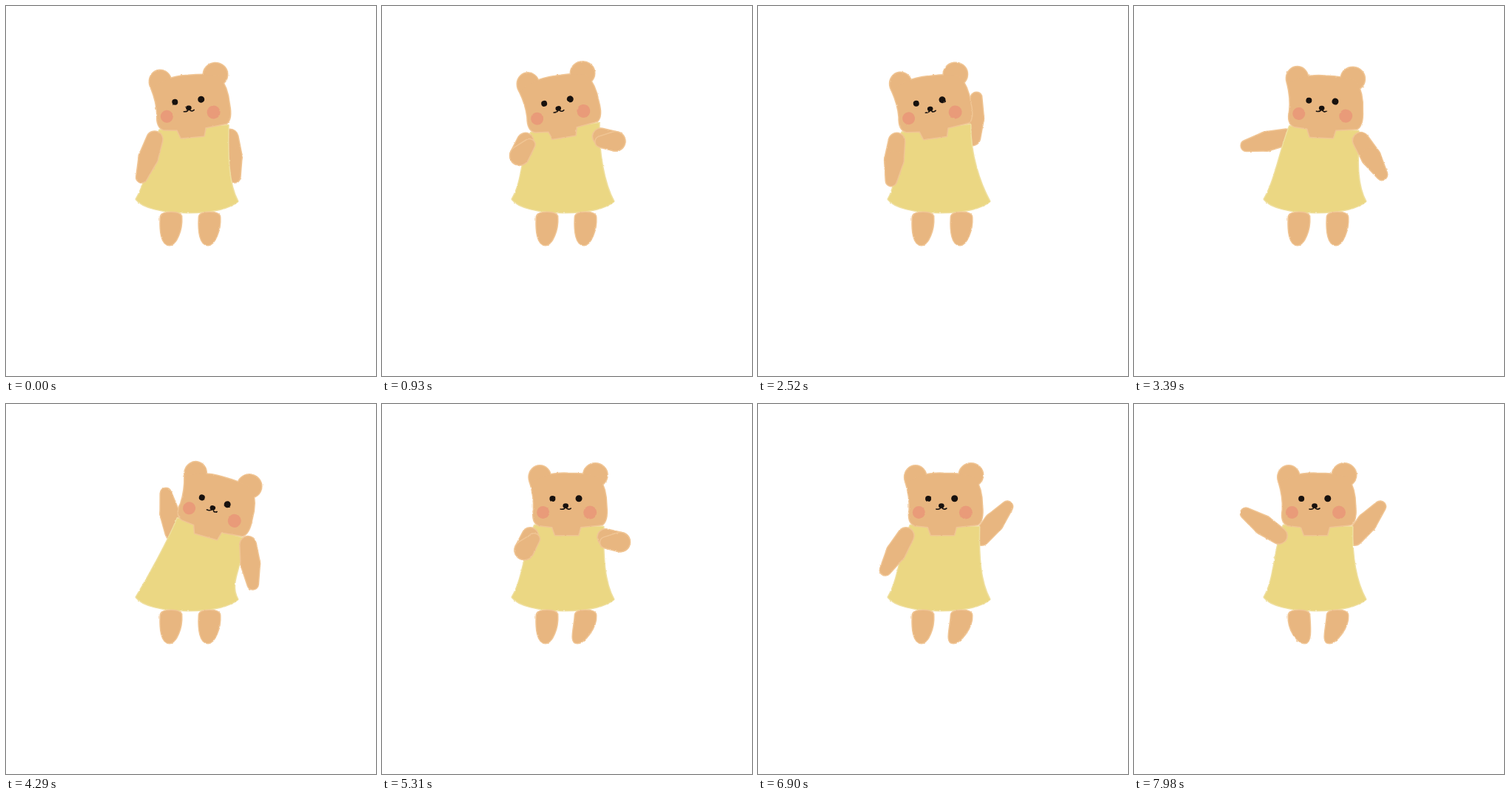
Animation, 500 px wide and 500 px high, one loop 8000 ms. Source, as an HTML page with a canvas:

```html
<!DOCTYPE html>
<html lang="en">
<head>
<meta charset="utf-8">
<title>Dancing bear</title>
<style>
  html, body { margin: 0; width: 100%; height: 100%; overflow: hidden; background: #fff; }
  canvas { display: block; width: 100vmin; height: 100vmin; margin: auto; filter: url(#crayon); }
  svg { position: absolute; width: 0; height: 0; }
</style>
</head>
<body>
<svg aria-hidden="true">
  <filter id="crayon" color-interpolation-filters="sRGB">
    <feTurbulence type="fractalNoise" baseFrequency=".22" numOctaves="2" seed="4"/>
    <feDisplacementMap in="SourceGraphic" scale="2" xChannelSelector="R" yChannelSelector="G"/>
  </filter>
</svg>
<canvas id="stage" width="500" height="500"></canvas>
<script>
const ctx = document.getElementById('stage').getContext('2d');
const LOOP = 8000, STEP = 30, LAST = 7980;
const FUR = '#e8b680', FUR_EDGE = '#f0c594', DRESS = '#ebd783', DRESS_EDGE = '#efdf9f';
const CHEEK = '#e99b79', INK = '#17110e';

const rad = deg => deg * Math.PI / 180;
const mix = (a, b, k) => a + (b - a) * k;
const smooth = (from, to, v) => {
  const k = Math.min(1, Math.max(0, (v - from) / (to - from)));
  return k * k * (3 - 2 * k);
};
const bump = (t, centre, width) => Math.exp(-(((t - centre) / width) ** 2));
// Swing that is low at the start and high at the end, with n + 1/2 beats between
const flap = (t, beats, low, high) => mix(low, high, (1 - Math.cos(2 * Math.PI * beats * t / LAST)) / 2);

// A long lean to the left, then a short one to the right; the arms fold twice
function poseAt(t) {
  const lean = 38 * bump(t, 4050, 550) - 21 * bump(t, 1900, 1100);
  const fold = bump(t, 930, 220) + bump(t, 5310, 220);
  const hold = smooth(0, 14, Math.abs(lean));
  const armAngle = (free, leanLeft, leanRight, folded) =>
    mix(mix(free, lean < 0 ? leanLeft : leanRight, hold), folded, fold);
  return {
    lean, fold,
    x: 248 + lean - 4 * bump(t, LAST, 600),
    y: 138 + Math.abs(lean) * .09,
    tilt: rad(lean / 2 - 6 * bump(t, 450, 900)),
    leftAngle: armAngle(flap(t, 4.5, 19, 124), 8, 169, 22),
    rightAngle: armAngle(flap(t, 7.5, 4, 140), 174, 7, 72),
    leftFoot: 221 + 10 * smooth(6900, LAST, t),
    rightFoot: 273 - 9 * smooth(4300, 5300, t)
  };
}

function circle(x, y, rx, ry = rx) {
  const p = new Path2D();
  p.ellipse(x, y, rx, ry, 0, 0, 2 * Math.PI);
  return p;
}

// Rounded limb segment with a different radius at each end
function taper([ax, ay], ra, [bx, by], rb) {
  const dx = bx - ax, dy = by - ay, angle = Math.atan2(dy, dx);
  const ratio = (ra - rb) / Math.max(Math.hypot(dx, dy), 1e-3);
  const phi = Math.acos(Math.min(1, Math.max(-1, ratio)));
  const p = new Path2D();
  p.arc(ax, ay, ra, angle + phi, angle + 2 * Math.PI - phi);
  p.arc(bx, by, rb, angle - phi, angle + phi);
  p.closePath();
  return p;
}

function paint(paths, fill, edge) {
  ctx.strokeStyle = edge;
  ctx.fillStyle = fill;
  ctx.lineWidth = 3;
  ctx.lineJoin = 'round';
  paths.forEach(p => ctx.stroke(p));
  paths.forEach(p => ctx.fill(p));
}

// side is -1 for left and 1 for right; angle opens outward from straight down
function drawArm(shoulder, side, angle, fold) {
  const reach = ([x, y], length, deg) =>
    [x + side * length * Math.sin(rad(deg)), y + length * Math.cos(rad(deg))];
  const elbow = reach(shoulder, mix(26, 21, fold), angle);
  const hand = reach(elbow, mix(28, 20, fold), angle - 160 * fold);
  const upper = taper(shoulder, 10.5, elbow, 12.5), fore = taper(elbow, 12.5, hand, 7);
  const groups = fold > .5 ? [[upper], [fore]] : [[upper, fore]];
  groups.forEach(g => paint(g, FUR, FUR_EDGE));
}

function drawLeg(x, foot) {
  paint([new Path2D(`M${x - 14} 286Q${x - 14} 279 ${x} 279Q${x + 14} 279 ${x + 14} 286
    C${x + 15} 302 ${foot + 9} 323 ${foot} 323C${foot - 11} 323 ${x - 15} 304 ${x - 14} 286Z`)], FUR, FUR_EDGE);
}

function drawDress([lx, ly], [rx, ry]) {
  const p = new Path2D();
  p.moveTo(lx, ly);
  p.bezierCurveTo(lx - 13, ly + 32, 191, 236, 176, 261);
  p.bezierCurveTo(184, 272, 212, 279, 245, 279);
  p.bezierCurveTo(282, 279, 304, 272, 313, 264);
  p.bezierCurveTo(300, 240, rx - 1, ry + 40, rx, ry);
  p.closePath();
  paint([p], DRESS, DRESS_EDGE);
}

const skull = new Path2D(`M-31-40Q-12-45 3-44Q28-44 44-40Q55-24 55 0
  Q57 20 49 25L20 28L17 39L-14 39L-18 28L-36 26Q-46 22-43 5Q-42-12-48-32Z`);
const mouth = new Path2D('M-7 4Q-2 5 0 1Q3 6 7 3');

function drawHead(x, y, tilt) {
  ctx.save();
  ctx.translate(x, y);
  ctx.rotate(tilt);
  paint([circle(-35, -39, 14.5, 15.5), circle(40, -42, 16, 15.5), skull], FUR, FUR_EDGE);
  ctx.fillStyle = CHEEK;
  ctx.fill(circle(-30.5, 8.5, 8.5));
  ctx.fill(circle(33, 8.5, 9));
  ctx.fillStyle = ctx.strokeStyle = INK;
  ctx.fill(circle(-17.8, -10, 4));
  ctx.fill(circle(17.8, -10.3, 4.5));
  ctx.fill(circle(0, -.5, 3.8, 3.2));
  ctx.lineWidth = 1.6;
  ctx.lineCap = 'round';
  ctx.stroke(mouth);
  ctx.restore();
}

function draw(t) {
  const pose = poseAt(t);
  const onBody = (dx, dy, a) => {
    const c = Math.cos(a), s = Math.sin(a);
    return [pose.x + dx * c - dy * s, pose.y + dx * s + dy * c];
  };
  const leftArm = () => drawArm(onBody(-48, 40, pose.tilt / 2), -1, pose.leftAngle, pose.fold);
  const rightArm = () => drawArm(onBody(54, 42, pose.tilt / 2), 1, pose.rightAngle, pose.fold);
  const leansRight = pose.lean > 5;
  const rightInFront = leansRight || pose.fold > .5;

  ctx.clearRect(0, 0, 500, 500);
  if (leansRight) leftArm();
  if (!rightInFront) rightArm();
  drawDress(onBody(-42, 26, pose.tilt), onBody(51, 28, pose.tilt));
  drawLeg(223, pose.leftFoot);
  drawLeg(275, pose.rightFoot);
  drawHead(pose.x, pose.y, pose.tilt);
  if (!leansRight) leftArm();
  if (rightInFront) rightArm();
}

const start = performance.now();
function tick() {
  const t = (performance.now() - start) % LOOP;
  draw(Math.floor(t / STEP) * STEP);
  requestAnimationFrame(tick);
}
tick();
</script>
</body>
</html>
```
